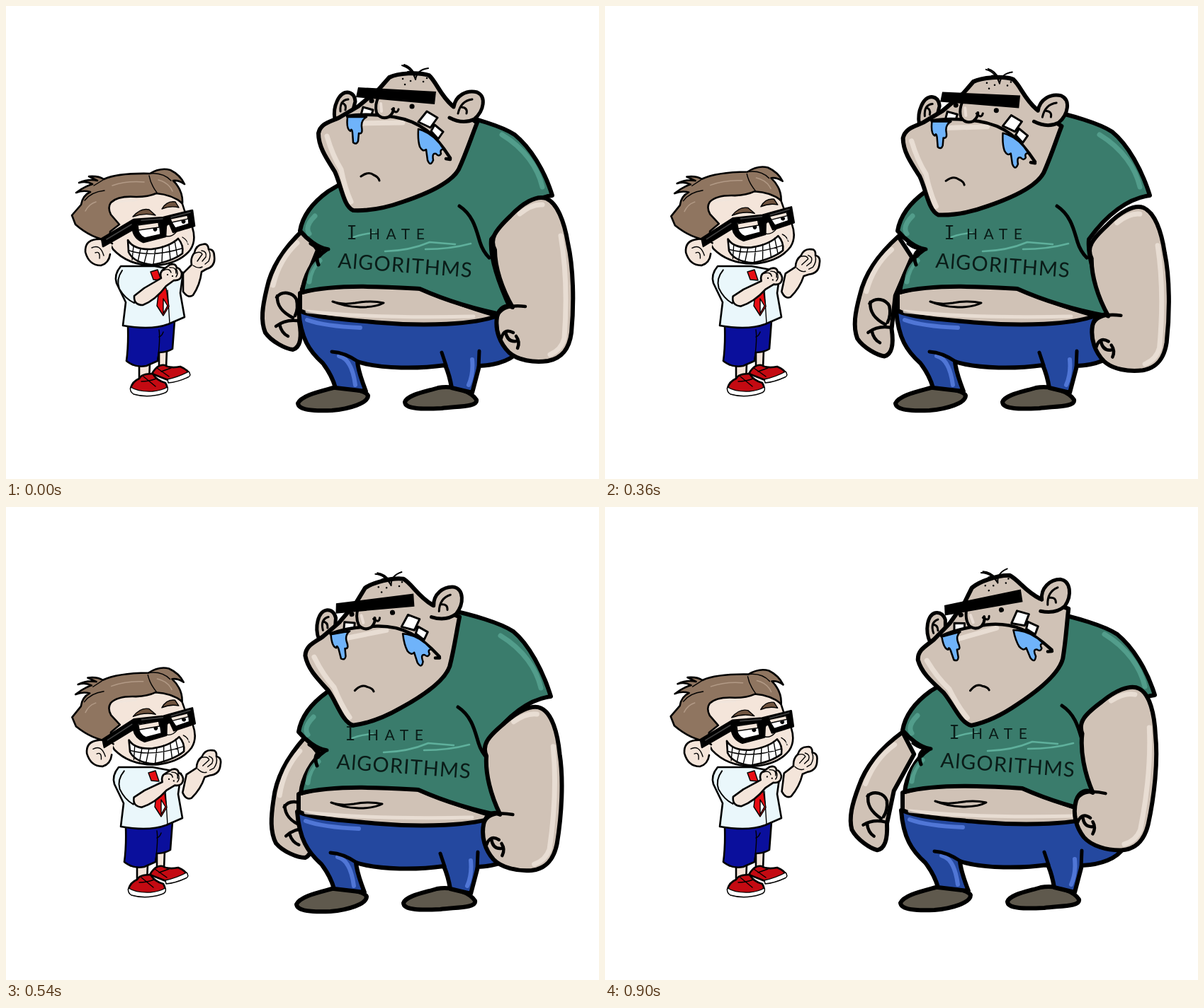
Animation of 837x669 px, one loop 1.08 s. Source, as an HTML page:

```html
<!DOCTYPE html>
<html lang="en">
<head>
<meta charset="utf-8">
<title>Boy and giant</title>
<style>
html, body { margin: 0; height: 100%; overflow: hidden; background: #fff; }
svg { display: block; width: 100vw; height: 100vh; }
path, ellipse { stroke-linecap: round; stroke-linejoin: round; }
#giant { stroke: #000; stroke-width: 6; fill: none; }
#boy { stroke: #000; stroke-width: 2.6; fill: none; }
#giant .thin { stroke-width: 3; }
#boy .thin { stroke-width: 1.4; }
#giant .skin { fill: #d0c2b6; }
#boy .skin { fill: #f4e5da; }
.shirt { fill: #3a7c6c; }
.denim { fill: #24489f; }
.sole { fill: #5f594d; }
.hair { fill: #8f7560; }
.brow { fill: #70543f; }
.cloth { fill: #eaf7fb; }
.shorts { fill: #0a0f9c; }
.red { fill: #c40a12; }
.white { fill: #fff; }
.tear { fill: #6fb3fa; }
.ink { fill: #000; }
#giant .glow, #boy .glow { stroke: #f1e6dd; stroke-width: 7; opacity: .75; }
#giant .mint { stroke: #5aa896; stroke-width: 7; opacity: .75; }
#giant .blue { stroke: #5f86e8; stroke-width: 6; opacity: .75; }
#giant text { font-family: Lato, "Open Sans", sans-serif; fill: #0a1c18; stroke: none; }
</style>
</head>
<body>
<svg viewBox="0 0 837 669" preserveAspectRatio="none">
<g id="boy">
  <g id="farArm">
    <path class="skin" d="M250 378L250 404Q257 414 264 409Q274 394 276 376L283 372Q296 368 294 354Q294 344 286 344Q285 335 278 337Q268 338 266 349Q260 356 262 366Z"/>
    <path class="thin" d="M266 350Q274 346 277 351L270 361M276 346Q284 347 282 355L277 361M286 345Q290 352 286 361L281 365M264 367Q271 372 277 369"/>
  </g>
  <g id="boyBody">
    <path class="skin" d="M188 505L188 530L202 530L203 505ZM216 488L216 515L226 512L227 486Z"/>
    <path class="red" d="M206 520Q214 506 224 508Q232 513 246 510Q258 515 259 522Q246 531 231 530Z"/>
    <path class="white thin" d="M228 528Q243 525 258 517Q262 523 257 525Q242 532 229 533Z"/>
    <path class="red" d="M176 541Q178 531 188 527Q191 520 207 520Q213 530 225 533Q230 541 225 546L184 549Z"/>
    <path class="white thin" d="M176 539Q187 546 207 545Q219 544 228 539Q230 546 222 548Q200 555 180 549Q174 545 176 539Z"/>
    <path class="thin" d="M194 524L211 538M191 531Q202 531 212 527M213 512L230 524M219 517L233 512"/>
    <path class="shorts" d="M172 452Q173 480 170 502Q182 512 198 509L214 502L216 490Q227 490 235 485L238 445Z"/>
    <path class="thin" d="M216 458Q218 472 214 500M222 461Q220 467 216 468"/>
    <path class="cloth" d="M162 368Q152 380 156 392L169 419L165 452Q205 459 229 450L252 440L246 406L250 377Q230 371 210 368Z"/>
    <path class="thin" d="M184 418L190 398M228 402L231 449"/>
    <path class="red thin" style="fill:#e70d13" d="M204 376L214 373L219 388L208 387ZM217 392L226 399L230 425L222 438L213 424Z"/>
    <path class="white thin" d="M222 414L228 424L222 435Z"/>
  </g>
  <g id="boyHead">
    <path class="skin" d="M145 275Q151 267 185 267Q230 253 249 280Q254 298 263 313Q269 332 260 345Q245 364 212 367Q173 368 151 344L144 330Z"/>
    <path class="skin" d="M150 336Q140 328 127 330Q111 332 112 348Q117 367 134 367Q145 364 147 351"/>
    <path class="thin" d="M121 342Q133 336 138 353M126 349Q133 346 132 357"/>
    <path class="hair" d="M146 332Q121 329 98 309L93 296L106 281Q108 268 119 263Q109 260 99 264Q111 255 122 252Q113 247 103 250Q116 244 129 247L117 241Q131 240 138 245Q158 236 203 237Q218 228 232 232Q246 239 252 252Q244 246 236 247Q250 261 249 279Q235 267 212 265Q201 270 184 270Q158 268 148 278Q143 285 148 295L160 309L147 319Z"/>
    <path class="thin" d="M203 237Q222 235 233 247M202 240Q204 252 213 264M137 246L124 254M111 275Q120 263 139 261"/>
    <path d="M150 254Q170 247 195 249M112 290Q117 280 127 277M215 246Q230 250 235 262" stroke="#b29a86" stroke-width="1.5"/>
    <path class="brow thin" d="M179 298Q190 285 202 288L211 296Q195 292 179 298ZM220 287Q227 275 239 277L244 285Q232 282 220 287Z"/>
    <path class="ink" d="M135 329L180 302L222 299L230 297L263 289L266 311L236 320L231 308L226 309L225 326L194 334Q181 329 179 316L137 340Z"/>
    <path class="white thin" d="M185 309L216 305L218 323L196 328Q186 324 185 309ZM231 301L257 295L258 308L239 314Z"/>
    <path class="skin thin" d="M186 310L215 306L216 313L187 317ZM232 301L256 296L257 301L234 306Z"/>
    <path class="ink" stroke="none" d="M208 314a3 3 0 1 0 5 0ZM248 303a3 3 0 1 0 5 0Z"/>
    <path d="M142 330L177 309M191 303L221 301M233 299L260 292" stroke="#444" stroke-width="1.5"/>
    <path class="thin" d="M224 325Q233 328 240 320Q242 315 237 313M228 309Q223 315 225 322"/>
    <path class="white" d="M172 331Q180 345 205 344Q230 341 243 329Q251 338 249 350Q235 361 206 366Q180 363 173 348Z"/>
    <path class="thin" d="M174 346Q205 356 248 343M180 339L178 359M190 343L186 362M200 344L195 364M211 343L208 365M221 340L220 362M230 337L232 359M238 332L242 355M249 327Q256 331 257 337"/>
    <path class="glow" d="M155 277L184 275M258 320L257 335" style="stroke-width:3"/>
  </g>
  <g id="nearArm">
    <path class="cloth" d="M164 374Q155 387 160 400Q168 414 181 420Q184 407 195 399" style="stroke-width:2"/>
    <path class="skin" d="M181 410Q180 423 193 423Q211 416 226 396L237 388Q248 389 248 378Q246 371 241 370Q239 363 231 366L223 372Q216 376 219 385L195 399Z"/>
    <path class="thin" d="M222 374Q231 370 233 377M231 370Q241 369 240 378M240 371Q244 378 240 383"/>
    <path class="ink" stroke="none" d="M227 379h2v2h-2zM234 381h2v2h-2z"/>
  </g>
</g>
<g id="giant">
  <g id="leftArm">
    <path class="skin" d="M420 316C400 335 375 365 368 400C362 425 359 445 366 462C375 475 395 485 405 486C415 483 418 470 414 447L418 400L440 345Z"/>
    <path class="glow" d="M411 335Q386 358 377 395"/>
    <path d="M382 412C390 402 405 405 410 415Q413 428 408 438M383 410C382 425 391 434 405 441M381 453Q394 443 411 445M386 450Q389 463 398 467" stroke-width="4.5"/>
  </g>
  <g id="giantBody">
    <path class="sole" d="M412 562C417 551 440 546 462 540C480 538 508 544 511 551C511 562 484 570 460 572C435 573 413 572 412 562ZM563 560C567 550 590 546 610 540C635 536 658 547 664 557C666 567 640 566 615 569C590 570 563 571 563 560Z"/>
    <path class="denim" d="M413 431C416 470 428 488 447 505Q460 522 465 540L508 545C503 532 497 515 496 503C530 514 585 513 620 508Q626 522 629 540L658 547L668 509C695 508 718 499 727 484L700 438L560 445Z"/>
    <path class="blue" d="M425 444Q450 453 500 455M470 495Q488 499 493 536M658 500Q660 520 653 536"/>
    <path d="M460 489Q478 490 497 503M615 490L621 508M668 488L667 512" stroke-width="5"/>
    <path class="skin" d="M415 406C460 390 550 396 588 398Q630 420 694 438C660 451 590 453 530 448C485 444 435 441 415 431Z"/>
    <path class="glow" d="M425 432Q520 442 660 439" style="stroke-width:5"/>
    <path class="thin" d="M461 418Q474 423 493 420Q515 416 533 420Q522 426 500 426Q476 425 461 418"/>
    <path class="shirt" id="shirt"/>
    <path class="mint" d="M700 182C733 202 751 230 757 256M436 297Q421 312 428 322M428 390Q430 370 443 360"/>
    <path d="M535 347Q570 346 598 334L634 337M592 344Q627 344 656 336M486 329Q500 322 520 321" stroke="#5fb09c" stroke-width="2.5"/>
    <path d="M640 283C660 296 664 318 669 334Q673 347 682 356M430 336Q442 345 455 344M443 347Q436 353 441 366" stroke-width="5"/>
    <text x="480" y="330" font-size="27" style="font-family:'Noto Sans Mono','DejaVu Sans Mono',monospace">I</text>
    <text x="512" y="330" font-size="21" letter-spacing="8.5">HATE</text>
    <text transform="translate(468 370) rotate(4.2)" font-size="29" letter-spacing="1.2">AlGORITHMS</text>
  </g>
  <g id="rightArm">
    <path class="skin" d="M690 345C682 330 690 318 712 297C728 280 748 267 762 272C778 278 788 305 793 335C801 370 802 420 798 462C795 485 785 498 765 502C745 505 722 501 710 490C698 478 690 460 693 440C696 426 706 422 715 426C700 400 690 370 690 345Z"/>
    <path class="glow" d="M783 325Q794 390 788 470Q784 486 768 493M725 294Q742 280 757 281"/>
    <path d="M693 440Q700 421 733 425M699 470Q703 455 716 462M705 461Q708 476 720 474M720 467Q726 475 722 484" stroke-width="4.5"/>
  </g>
  <g id="giantHead">
    <path class="skin" d="M464 160C461 142 470 122 482 122Q492 123 493 135L488 154Z" stroke-width="5"/>
    <path class="thin" d="M472 149Q471 133 483 132M474 137Q481 139 479 147"/>
    <path class="skin" d="M541 101C553 95 582 93 597 98C608 108 612 125 630 141L665 165C657 185 650 207 639 231C628 251 590 267 560 277C535 286 511 290 490 289C476 283 473 253 464 234C452 215 441 199 441 180C444 166 457 164 470 158L497 142L526 118Z"/>
    <path class="glow" d="M453 184Q461 212 473 231Q478 257 487 277M500 166L560 165"/>
    <path class="skin" d="M632 143C634 127 650 118 665 122C678 128 675 148 661 160Q645 168 626 158" stroke-width="5"/>
    <path class="thin" d="M638 152Q642 134 658 132M643 143Q652 144 650 152"/>
    <path class="white thin" d="M501 154L504 143L518 147L516 154ZM582 164L594 149L609 158L599 172ZM600 177L605 168L617 178L610 188Z"/>
    <path d="M482 156Q505 151 548 157C585 163 606 182 627 215M621 216L627 217" stroke-width="4.5"/>
    <path class="tear thin" d="M482 157Q480 174 486 177Q488 172 489 179L490 193Q495 197 497 191L498 180Q504 182 502 171Q501 161 509 157ZM582 174Q581 190 584 199Q588 207 593 203L595 218Q599 228 603 218Q601 207 607 209Q611 214 614 209Q612 202 618 203Q606 183 588 176Z" style="stroke-width:2.5"/>
    <path class="skin" d="M526 128Q520 140 523 151Q529 161 540 157Q547 152 547 145" stroke-width="4"/>
    <path class="glow" d="M529 138L530 149" style="stroke-width:4"/>
    <path class="thin" d="M545 146Q552 154 554 146M501 241Q512 233 519 239Q526 242 527 247"/>
    <path class="ink" stroke="none" d="M497 115L607 121L605 139L494 129Z"/>
    <path d="M516 134h.1M573 142h.1" stroke-width="7"/>
    <path d="M560 103h.1M571 106h.1M589 107h.1M563 111h.1M594 102h.1" stroke-width="2.5"/>
    <path d="M559 84Q573 88 578 104Q580 90 596 88M567 93Q576 91 577 98M562 83Q572 86 577 97" stroke-width="2"/>
  </g>
</g>
</svg>
<script>
const STEP = 180;
const part = id => document.getElementById(id);

// Pivot of every moving part; poses hold [dx, dy, degrees].
const pivots = {
  giantHead: [544.5, 167.5], rightArm: [746, 387], leftArm: [425, 315], giantBody: [0, 0],
  boyHead: [130, 345], farArm: [255, 400], nearArm: [185, 405], boyBody: [0, 0]
};
const guard = { boyHead: [2, 0, -2], farArm: [0, 1, 12], nearArm: [0, 1, 5], boyBody: [-3, 0, 0] };
const poses = [
  { lift: 0 },
  { giantHead: [-14.5, -2, 0], rightArm: [-1, 17, 0], leftArm: [-2, 2, .5], giantBody: [-1, 0, 0],
    farArm: [-2, 0, 0], boyBody: [-2, 0, 0], lift: 1 },
  { giantHead: [-20.5, 6, -.5], rightArm: [-4, 13, 1], leftArm: [-6, 10, 1.5], giantBody: [-2, 0, 0], ...guard, lift: 4 },
  { giantHead: [-22.5, 12, -10.3], rightArm: [-15, 11, 4], leftArm: [2, 9, -5], giantBody: [-2, 0, 0], ...guard, lift: 6 },
  { giantHead: [-32.5, 15, -16.5], rightArm: [-24, -2, 15], leftArm: [-5, 4, 1], giantBody: [0, 0, 0], ...guard, lift: 9 },
  { giantHead: [-6, 10, -15], rightArm: [-22, -18, 7], leftArm: [0, 3, 7], giantBody: [5, -2, 0],
    boyHead: [0, 0, -.3], farArm: [0, -1, 7], nearArm: [0, 0, 2], boyBody: [-3, 0, 0], lift: 0 }
];

const shirtPath = lift => `M455 262C430 280 418 300 415 318C425 330 440 342 453 344
  C432 358 420 385 418 405C470 392 550 398 584 400Q640 425 708 438L712 428C690 380 683 350 685 330
  C710 295 740 272 771 268C760 232 740 ${200 - lift} 718 ${182 - lift}
  C700 ${170 - lift} 660 ${158 - lift} 620 ${150 - lift}L560 200Z`;

function draw() {
  const pose = poses[Math.floor(performance.now() / STEP) % poses.length];
  for (const [id, [px, py]] of Object.entries(pivots)) {
    const [dx, dy, angle] = pose[id] || [0, 0, 0];
    part(id).setAttribute("transform", `translate(${dx} ${dy}) rotate(${angle} ${px} ${py})`);
  }
  part("shirt").setAttribute("d", shirtPath(pose.lift));
  requestAnimationFrame(draw);
}
draw();
</script>
</body>
</html>
```
